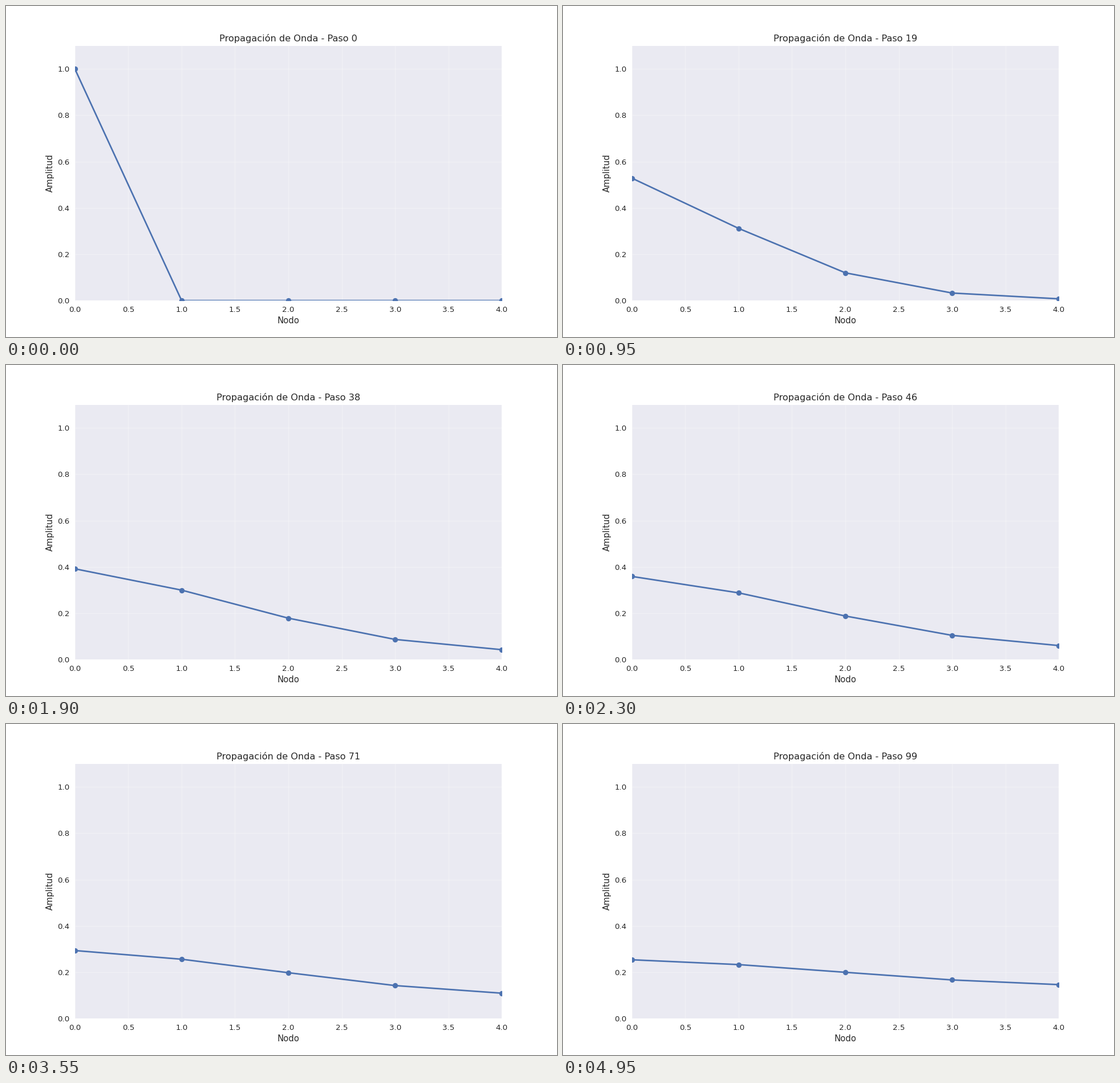
Animation, 966 px wide and 580 px high, one loop 5000 ms. Source, as a matplotlib script:

```python
import numpy as np
import matplotlib.pyplot as plt
from matplotlib.animation import FuncAnimation

WIDTH, HEIGHT, DPI = 966, 580, 96.6
NODES, STEPS, DT = 5, 100, 0.05

plt.style.use("seaborn-v0_8")
plt.rcParams["font.family"] = "DejaVu Sans"


def path_laplacian(n):
    adjacency = np.eye(n, k=1) + np.eye(n, k=-1)
    return np.diag(adjacency.sum(axis=1)) - adjacency


def simulate():
    """Explicit Euler diffusion of a unit pulse along a chain of nodes."""
    step = np.eye(NODES) - DT * path_laplacian(NODES)
    states = [np.eye(NODES)[0]]
    for _ in range(STEPS - 1):
        states.append(step @ states[-1])
    return states


def inches(pixels):
    # The small margin keeps float rounding from losing a pixel.
    return (pixels + 0.001) / DPI


states = simulate()

fig, ax = plt.subplots(figsize=(inches(WIDTH), inches(HEIGHT)), dpi=DPI)
line, = ax.plot(range(NODES), states[0], "o-", color="#4C72B0", lw=2)
ax.set_xlim(0, NODES - 1)
ax.set_ylim(0, 1.1)
ax.set_xlabel("Nodo")
ax.set_ylabel("Amplitud")
ax.grid(True, alpha=0.3)
title = ax.set_title("")


def update(i):
    line.set_ydata(states[i])
    title.set_text(f"Propagación de Onda - Paso {i}")
    return line, title


anim = FuncAnimation(fig, update, frames=STEPS, interval=50,
                     repeat=True, repeat_delay=0, blit=False)
plt.show()
```
